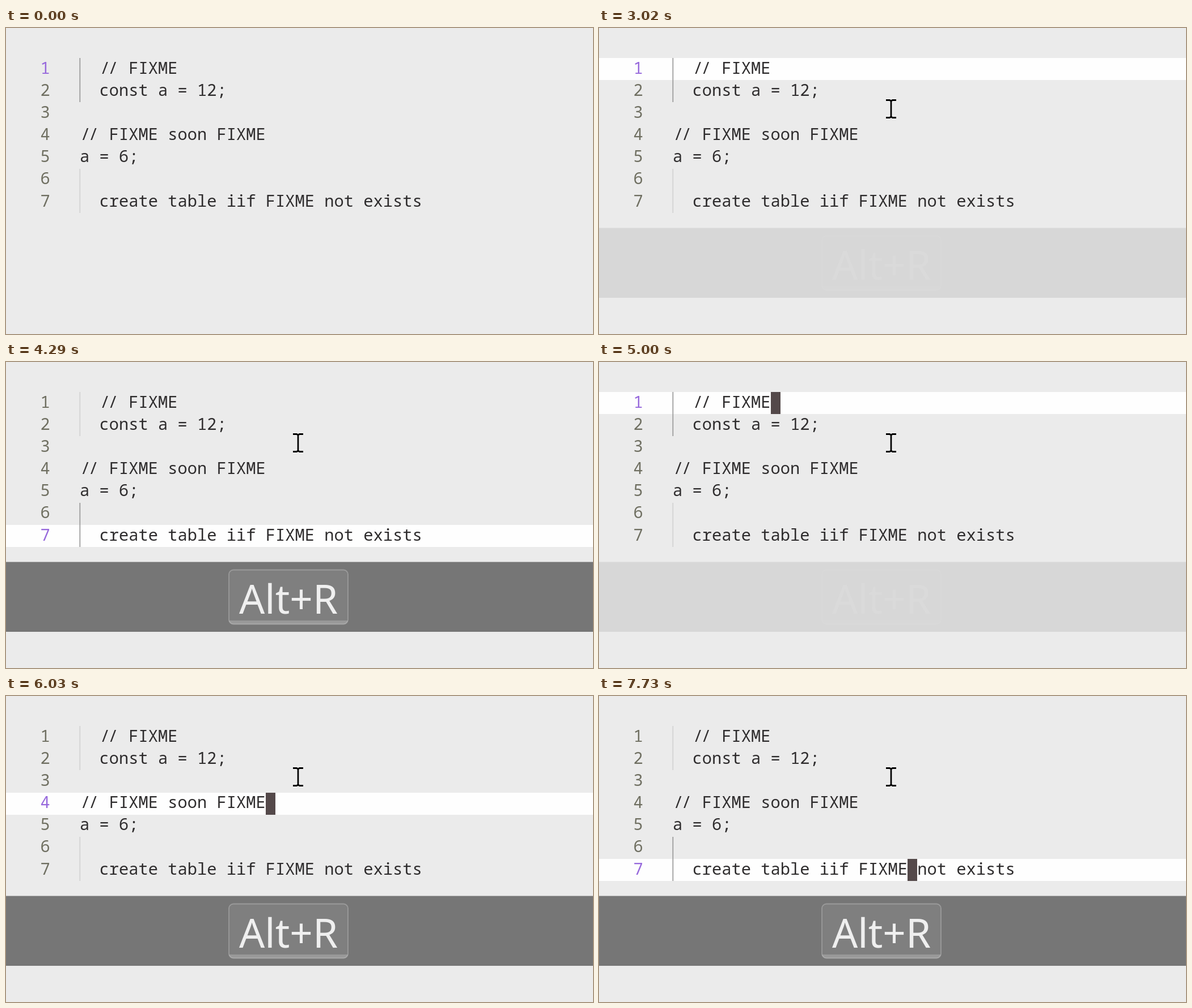
An HTML page with a canvas that plays this animation: 1035x541 px, repeating every 8 s.

```html
<!DOCTYPE html>
<html lang="en">
<head>
<meta charset="utf-8">
<title>Jumping between FIXME comments</title>
<style>
  html, body { margin: 0; width: 100%; height: 100%; overflow: hidden; background: #ebebeb; }
  canvas { display: block; width: 1035px; height: 541px; }
</style>
</head>
<body>
<canvas id="stage" width="1035" height="541"></canvas>
<script>
const ctx = document.getElementById('stage').getContext('2d');
const LOOP = 8000, W = 1035, H = 541;
const ADVANCE = 17.25, TEXT_X = 130, NUMBER_X = 60.5;
const CODE_FONT = '28.75px "Noto Sans Mono", monospace';
const KEY_FONT = '71px "Noto Sans", "Open Sans", sans-serif';
const INK = '#2e2c2d';

const lines = [
  '  // FIXME',
  '  const a = 12;',
  '',
  '// FIXME soon FIXME',
  'a = 6;',
  '',
  '  create table iif FIXME not exists'
];

// Each entry holds until the next one.
const caretTrack = [
  [0, 0, 7, false], [1250, 0, 7, true], [1890, 0, 7, false],
  [2370, 0, 7, true], [2870, 0, 7, false],
  [3100, 3, 8, true], [3400, 3, 19, true], [3810, 6, 24, true],
  [4290, 6, 24, false], [4760, 6, 24, true],
  [5000, 0, 10, true], [5460, 0, 10, false],
  [5760, 3, 8, true], [6030, 3, 19, true], [6340, 6, 24, true],
  [6790, 0, 10, true], [7100, 3, 8, true], [7420, 3, 19, true], [7730, 6, 24, true]
];

const pointerTrack = [
  [0], [240, 508, 414], [320, 425, 268], [390, 306, 55], [470],
  [710, 256, 24], [780, 255, 38], [860, 253, 54], [930, 252, 66],
  [1010, 252, 70], [1090, 252, 58],
  [1400, 300, 78], [1470, 410, 114], [1550, 495, 138], [1630, 515, 143]
];

const overlayTrack = [
  [0, 0], [3020, 0.17], [3100, 0.5], [3170, 0.82], [3250, 1],
  [4680, 0.5], [4760, 0],
  [5000, 0.17], [5070, 0.5], [5150, 0.82], [5220, 1]
];

const at = (track, t) => track.findLast(entry => entry[0] <= t);
const rowY = row => Math.round(53 + row * 39.17);
const colX = col => Math.round(130.4 + col * ADVANCE);

function rect(color, x, y, w, h) {
  ctx.fillStyle = color;
  ctx.fillRect(x, y, w, h);
}

function drawGuide(firstRow, active) {
  const top = rowY(firstRow);
  rect(active ? '#989898' : '#d2d2d2', 129.5, top, 1.7, rowY(firstRow + 2) - top);
}

function drawWordMarks() {
  lines.forEach((line, row) => {
    for (const match of line.matchAll(/FIXME/g)) {
      const x = colX(match.index), y = rowY(row);
      rect('#dbdad9', x, y, colX(match.index + 5) - x, rowY(row + 1) - y);
    }
  });
}

function drawCode(activeRow) {
  ctx.font = CODE_FONT;
  ctx.textAlign = 'left';
  lines.forEach((line, row) => {
    const y = 80.5 + row * 39.17;
    ctx.fillStyle = row === activeRow ? '#9769dc' : '#6f6f61';
    ctx.fillText(row + 1, NUMBER_X, y);
    ctx.fillStyle = INK;
    const start = line.indexOf('//');
    [...line].forEach((char, col) => {
      // The comment slashes sit close together.
      const shift = char === '/' ? (col === start ? 1.6 : -1.6) : 0;
      ctx.fillText(char, TEXT_X + col * ADVANCE + shift, y);
    });
  });
}

function drawCaret(row, col) {
  const x = colX(col), y = rowY(row);
  rect('#54494a', x, y, 17, rowY(row + 1) - y);
  const char = lines[row][col];
  if (char) {
    ctx.fillStyle = '#ebebeb';
    ctx.fillText(char, TEXT_X + col * ADVANCE, 80.5 + row * 39.17);
  }
}

function drawOverlay(opacity) {
  if (!opacity) return;
  ctx.save();
  ctx.globalAlpha = opacity;
  rect('rgba(0, 0, 0, 0.497)', 0, 353.5, W, 123.5);
  // Fade the key with the bar by mixing opaque tones at group opacity.
  ctx.beginPath();
  ctx.roundRect(393, 367.5, 210, 96, 8);
  ctx.fillStyle = 'rgba(255, 255, 255, 0.065)';
  ctx.fill();
  ctx.save();
  ctx.clip();
  rect('rgba(255, 255, 255, 0.2)', 392, 457, 212, 8);
  ctx.restore();
  ctx.strokeStyle = 'rgba(255, 255, 255, 0.24)';
  ctx.lineWidth = 1.8;
  ctx.stroke();
  ctx.font = KEY_FONT;
  ctx.textAlign = 'center';
  ctx.fillStyle = '#efefef';
  ctx.fillText('Alt+R', 498, 445);
  ctx.restore();
}

function drawPointer(x, y) {
  if (x === undefined) return;
  ctx.beginPath();
  for (const side of [-1, 1]) {
    const end = y + side * 15.5;
    ctx.moveTo(x - 9, end);
    ctx.lineTo(x - 2.5, end);
    ctx.lineTo(x, end - side * 1.5);
    ctx.lineTo(x + 2.5, end);
    ctx.lineTo(x + 9, end);
  }
  ctx.moveTo(x, y - 14);
  ctx.lineTo(x, y + 14);
  ctx.strokeStyle = '#f5f5f5';
  ctx.lineWidth = 4.6;
  ctx.stroke();
  ctx.strokeStyle = '#000';
  ctx.lineWidth = 2.8;
  ctx.stroke();
}

function draw(t) {
  const [, row, col, caretOn] = at(caretTrack, t);
  rect('#ebebeb', 0, 0, W, H);
  if (t >= 1250) rect('#fefefe', 0, rowY(row), W, rowY(row + 1) - rowY(row));
  if (t >= 1550 && t < 3020) drawWordMarks();
  drawGuide(0, row < 2);
  drawGuide(5, row > 4);
  drawCode(row);
  if (caretOn) drawCaret(row, col);
  drawOverlay(at(overlayTrack, t)[1]);
  const [, x, y] = at(pointerTrack, t);
  drawPointer(x, y);
}

const start = performance.now();
function tick() {
  draw((performance.now() - start) % LOOP);
  requestAnimationFrame(tick);
}
tick();
</script>
</body>
</html>
```
